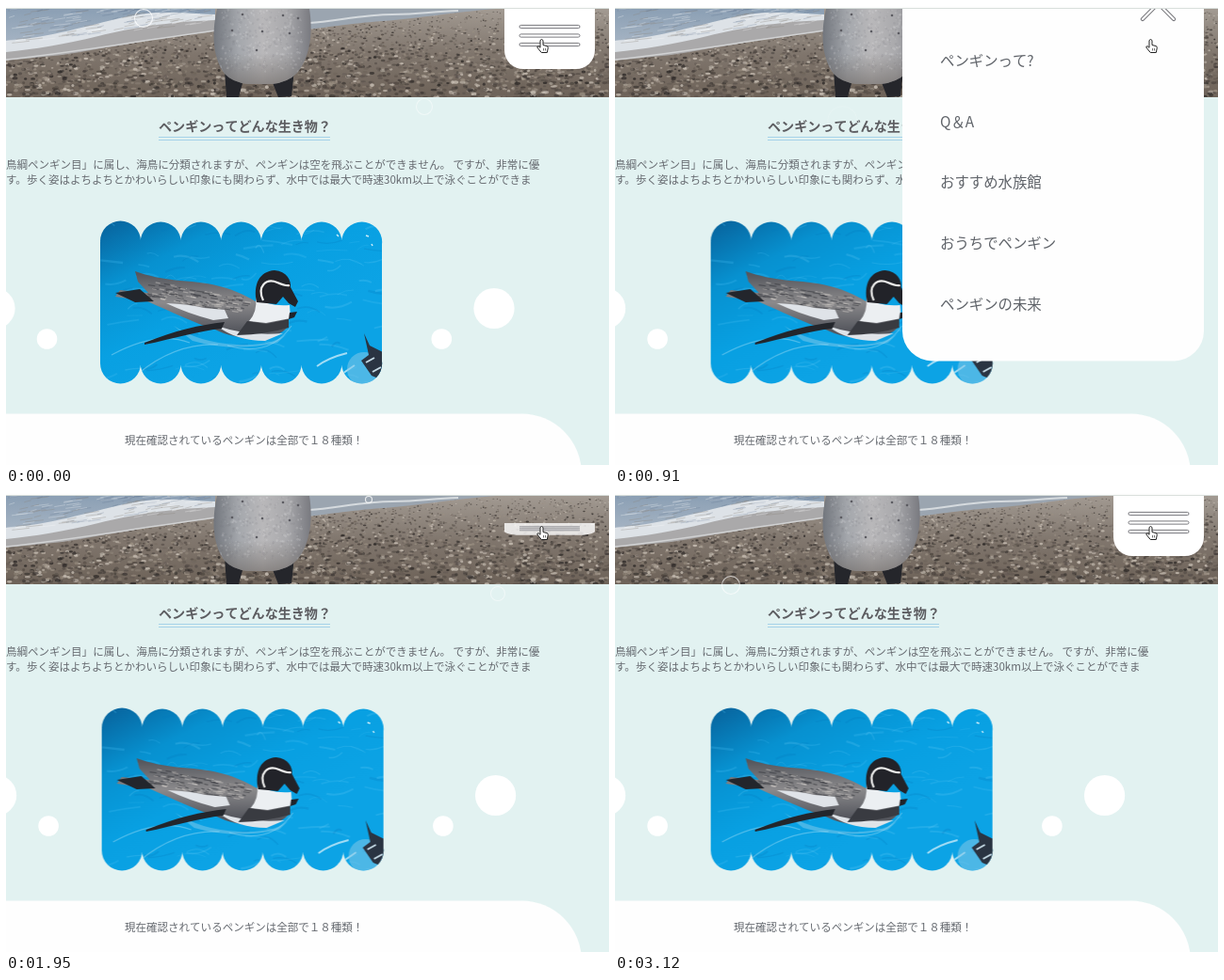
Animation of 640x488 px, one loop 3.25 s. Source, as an HTML page with a canvas:

```html
<!DOCTYPE html>
<html lang="ja">
<meta charset="utf-8">
<style>
html, body { margin: 0; width: 640px; height: 488px; overflow: hidden; }
canvas { display: block; }
</style>
<canvas id="stage" width="640" height="488"></canvas>
<script>
const W = 640, H = 488, LOOP = 3250, STEP = 130;
const ctx = document.getElementById('stage').getContext('2d');
const clamp = v => Math.max(0, Math.min(1, v));
const progress = (t, from, to) => clamp((t - from) / (to - from));

let seed = 7;
const rand = (a = 0, b = 1) => {
  seed = (seed * 16807) % 2147483647;
  return a + (b - a) * seed / 2147483647;
};
const pick = list => list[Math.floor(rand(0, list.length))];

function fill(g, color, path) {
  g.fillStyle = color;
  g.fill(typeof path === 'string' ? new Path2D(path) : path);
}
function line(g, color, width, path) {
  g.strokeStyle = color;
  g.lineWidth = width;
  g.stroke(new Path2D(path));
}
function circle(g, color, x, y, r) {
  const p = new Path2D();
  p.arc(x, y, r, 0, 7);
  fill(g, color, p);
}
function box(g, color, x, y, w, h, radii) {
  const p = new Path2D();
  p.roundRect(x, y, w, h, radii);
  fill(g, color, p);
}
function gradient(g, x0, y0, x1, y1, ...colors) {
  const grad = g.createLinearGradient(x0, y0, x1, y1);
  colors.forEach((c, i) => grad.addColorStop(i / (colors.length - 1), c));
  return grad;
}
function text(str, x, y, size, color, weight = 300) {
  ctx.font = `${weight} ${size}px "Noto Sans CJK JP", "Noto Sans CJK", sans-serif`;
  ctx.textBaseline = 'alphabetic';
  ctx.fillStyle = color;
  ctx.fillText(str, x, y + size * .37);
}
function layer(draw) {
  const c = document.createElement('canvas');
  c.width = W;
  c.height = H;
  draw(c.getContext('2d'));
  return c;
}

const beach = layer(g => {
  g.beginPath();
  g.rect(0, 3, W, 94);
  g.clip();
  g.fillStyle = gradient(g, 0, 3, 0, 97, '#a29a92', '#80766d', '#6d6258');
  g.fillRect(0, 3, W, 94);
  for (let i = 0; i < 4200; i++) {
    const y = rand(6, 98), s = .7 + y / 50;
    g.fillStyle = pick(['#2d2927', '#4d453f', '#6f655c', '#9c9184', '#c9c0b5', '#574f4a']);
    g.globalAlpha = rand(.3, .85);
    g.beginPath();
    g.ellipse(rand(0, W), y, rand(.6, 1.4) * s, rand(.4, .8) * s, 0, 0, 7);
    g.fill();
  }
  g.globalAlpha = 1;
  fill(g, '#aaa9aa', 'M0 3H222V27C165 33 110 44 60 52L0 58Z');
  fill(g, gradient(g, 0, 3, 0, 42, '#8b9fb4', '#a7b5c4'), 'M0 3H222V13C150 17 80 32 0 42Z');
  fill(g, '#dde2e7', 'M0 37C50 33 85 21 125 12S190 8 222 9V15C170 17 135 23 98 32S30 46 0 49Z');
  line(g, '#d0d1d2', 1.5, 'M0 57C60 51 110 42 222 26');
  fill(g, '#9ba5b0', 'M318 3H520C470 7 440 13 400 16S340 23 318 25Z');
  line(g, '#d5dade', 2, 'M322 18C350 16 380 9 410 9S450 6 480 5');
  for (let i = 0; i < 150; i++) {
    const x = rand(0, 215), y = rand(4, 40) * (1 - x / 400);
    line(g, pick(['#ffffff44', '#5e738a44', '#8b847c55']), 1, `M${x} ${y}l${rand(5, 20)} -2`);
  }
  fill(g, '#25262b', 'M232 68L252 78L247 97H234ZM282 79L306 68L303 96L289 97Z');
  fill(g, gradient(g, 221, 0, 324, 0, '#73777e', '#a4a7ac', '#b9b8ba', '#a9a9ac', '#78797f'),
    'M224 3C217 34 221 57 232 72Q240 81 257 83H282Q300 81 309 71C323 54 326 28 322 3Z');
  fill(g, gradient(g, 0, 50, 0, 84, '#625b5600', '#625b5688'), 'M222 50H322L309 71Q300 81 282 83H257Q240 81 232 72Z');
  for (let i = 0; i < 420; i++)
    circle(g, pick(['#ffffff22', '#6d717722']), rand(228, 314), rand(4, 70), rand(.5, 1.5));
  for (const [x, y] of [[240, 26], [251, 9], [272, 27], [294, 10], [301, 29], [266, 47], [310, 13]])
    circle(g, '#5c5c62', x, y, 1.3);
});

const pool = layer(g => {
  const shape = new Path2D();
  shape.rect(100, 251, 299, 129);
  for (let i = 0; i < 7; i++)
    for (const y of [i ? 251 : 250, 380]) {
      const x = 121.5 + i * 42.7;
      shape.moveTo(x, y);
      shape.arc(x, y, 21.5, 0, 7);
    }
  g.clip(shape);
  g.fillStyle = gradient(g, 100, 228, 190, 402, '#08619a', '#0791d0', '#08a0e2', '#0ca3e5');
  g.fillRect(90, 220, 320, 190);
  for (let i = 0; i < 120; i++) {
    const x = rand(95, 400), y = rand(232, 402), w = rand(8, 34);
    line(g, pick(['#7ad4f830', '#0679bb40', '#43bdf044']), rand(.6, 2.4),
      `M${x} ${y}q${w / 2} ${rand(-8, 4)} ${w} ${rand(-6, 6)}`);
  }
  fill(g, '#7fc9ea88', 'M178 340Q205 358 245 360T301 346L288 358Q240 368 198 356Z');
  line(g, '#b6e6f866', 1.1, 'M112 371Q160 345 195 358M140 391Q180 358 225 360M235 361Q280 374 303 340');
  line(g, '#d9f2fbbb', 2, 'M330 383Q342 374 362 369M351 395L370 382');
  line(g, '#ffffffcc', 1.5, 'M351 243l2 2M382 244l3 1M388 253l1 2');
  fill(g, gradient(g, 0, 285, 0, 345, '#55575d', '#8b8a8c', '#55575e'),
    'M137 282C151 287 165 290 185 292C220 294 243 301 263 313L299 330Q304 343 286 350C265 356 240 353 222 344C200 337 175 325 150 314L116 309L121 302L151 305L140 293Z');
  for (let i = 0; i < 130; i++) {
    const x = rand(150, 254), y = 300 + (x - 155) * .16 + rand(-7, 11);
    line(g, pick(['#d0ccc777', '#2b2e3577']), 1.2, `M${x} ${y}l${rand(3, 8)} 1`);
  }
  fill(g, '#dfe3e8', 'M170 316Q195 317 210 321L232 323L236 332L220 334Q193 327 170 316ZM224 340Q255 351 294 348L275 356Q244 356 224 340Z');
  fill(g, '#23262c', 'M147 358C180 345 205 339 232 336L229 343C206 345 177 354 147 360ZM116 305L142 301L157 314L137 315Z');
  fill(g, '#eceff2', 'M265 309Q278 320 301 318L302 332L276 337L258 335Q267 325 265 309Z');
  fill(g, '#393b41', 'M256 335L276 338L300 333L300 342Q276 349 245 350Z');
  fill(g, '#222329', 'M266 315C262 296 269 282 285 281C298 282 303 292 302 299L310 314L307 320L300 316L294 309L287 317Z');
  line(g, '#eeeeed', 2.2, 'M273 313C266 298 276 289 288 294Q297 298 301 297');
  fill(g, '#20232a', 'M301 326L309 325L306 331L300 333Z');
  circle(g, '#83c9e988', 380, 386, 18);
  fill(g, '#2a3442', 'M380 348L386 361L400 368V398L388 393L377 377L385 371Z');
  line(g, '#c4d9e4', 2, 'M382 379L391 374M389 389L398 384');
});

// x, y at time t, radius and rising speed
const bubbles = [
  [146, 13, 0, 10, .13], [444, 107, 0, 9, .13], [131, 70, 1300, 10, .21],
  [259, 59, 1300, 16, .162], [385, 7, 1950, 4, .15], [522, 107, 1950, 8, .14],
  [123, 98, 3120, 10, .15]
];
function drawBubbles(t) {
  for (const [x, y, at, r, speed] of bubbles) {
    const rise = (t - at) * speed, cy = y - rise;
    if (cy > 125 || cy < -r) continue;
    ctx.strokeStyle = `rgba(255,255,255,${.8 * clamp((128 - cy) / 36)})`;
    ctx.lineWidth = 1.1;
    ctx.beginPath();
    ctx.arc(x + rise * .28, cy, r - .5, 0, 7);
    ctx.stroke();
  }
}

function bar(x, y, length, angle) {
  ctx.save();
  ctx.translate(x, y);
  ctx.rotate(angle);
  ctx.beginPath();
  ctx.roundRect(-length / 2, -1.6, length, 3.2, 1.6);
  ctx.fillStyle = '#fff';
  ctx.fill();
  ctx.strokeStyle = '#77777c';
  ctx.lineWidth = 1;
  ctx.stroke();
  ctx.restore();
}
function drawTab(open, crossing) {
  if (open <= 0) return;
  ctx.save();
  ctx.globalAlpha = Math.min(1, .72 + open * .4);
  ctx.translate(0, 39.3);
  ctx.scale(1, open);
  ctx.translate(0, -39.3);
  box(ctx, '#fff', 529, 3, 96, 64, [0, 0, 20, 20]);
  const angle = crossing * Math.PI / 4;
  bar(577, 22 + crossing * 9.5, 64, angle);
  if (crossing < .5) bar(577, 31.5, 64, 0);
  bar(577, 41 - crossing * 9.5, 64, -angle);
  ctx.restore();
}

const items = ['ペンギンって?', 'Q＆A', 'おすすめ水族館', 'おうちでペンギン', 'ペンギンの未来'];
function drawMenu(open) {
  if (open <= 0) return;
  ctx.save();
  ctx.beginPath();
  ctx.rect(0, 3, W, H);
  ctx.clip();
  ctx.translate(0, (open - 1) * 416);
  box(ctx, '#fefefe', 305, 3, 320, 416, 32);
  items.forEach((s, i) => text(s, 345, 100 + i * 64.7, 15.4, '#5f6369'));
  bar(576.5, 39, 50, Math.PI / 4);
  bar(576.5, 39, 50, -Math.PI / 4);
  ctx.restore();
}
function drawCursor() {
  const hand = 'M567 36.5q1.5-2 3 0v5l4 1q1.5 .5 1.3 2l-1 5h-6l-4.5-5.5q0-1.5 1.5-1.2l1.7 1.5Z';
  fill(ctx, '#fff', hand);
  line(ctx, '#222', 1, hand);
  line(ctx, '#333', .7, 'M570.5 45v2.5M572.5 45v2.5');
}

function render(t) {
  const shift = t >= 910 ? 1.6 : 0;
  const menu = t < 1300 ? progress(t, 640, 940) : 1 - progress(t, 1690, 1940);
  const tab = t < 1300 ? 1 - progress(t, 450, 700) : progress(t, 1910, 2110);
  ctx.fillStyle = '#e2f2f1';
  ctx.fillRect(0, 0, W, H);
  ctx.drawImage(beach, 0, 0);
  ctx.drawImage(pool, shift, 0);
  for (const [x, y, r] of [[-12, 321.5, 21.6], [43.5, 354, 10.8], [518, 321.5, 21.6], [462.3, 354, 10.8]])
    circle(ctx, '#fff', x + shift, y, r);
  box(ctx, '#fefefe', -80, 433.5, 691, 140, 64);

  text('ペンギンってどんな生き物？', 162, 128, 14.08, '#5c5c60', 700);
  ctx.fillStyle = '#a5d2e8';
  ctx.fillRect(162, 139, 182, 1);
  ctx.fillRect(162, 142, 182, 1);
  text('鳥綱ペンギン目」に属し、海鳥に分類されますが、ペンギンは空を飛ぶことができません。 ですが、非常に優', 0, 168.5, 11.52, '#666a70');
  text('す。歩く姿はよちよちとかわいらしい印象にも関わらず、水中では最大で時速30km以上で泳ぐことができま', 0, 185, 11.52, '#666a70');
  text('現在確認されているペンギンは全部で１８種類！', 126, 462, 11.52, '#666a70');

  drawBubbles(t);
  drawTab(tab, t < 1300 ? progress(t, 450, 650) : 0);
  drawMenu(menu);
  ctx.fillStyle = '#fdfdfd';
  ctx.fillRect(0, 0, W, 2);
  ctx.fillStyle = '#d9dfdc';
  ctx.fillRect(0, 2, W, 1);
  drawCursor();
}

function tick() {
  const t = performance.now() % LOOP;
  render(Math.floor(t / STEP) * STEP);
  requestAnimationFrame(tick);
}
tick();
</script>
</html>
```
